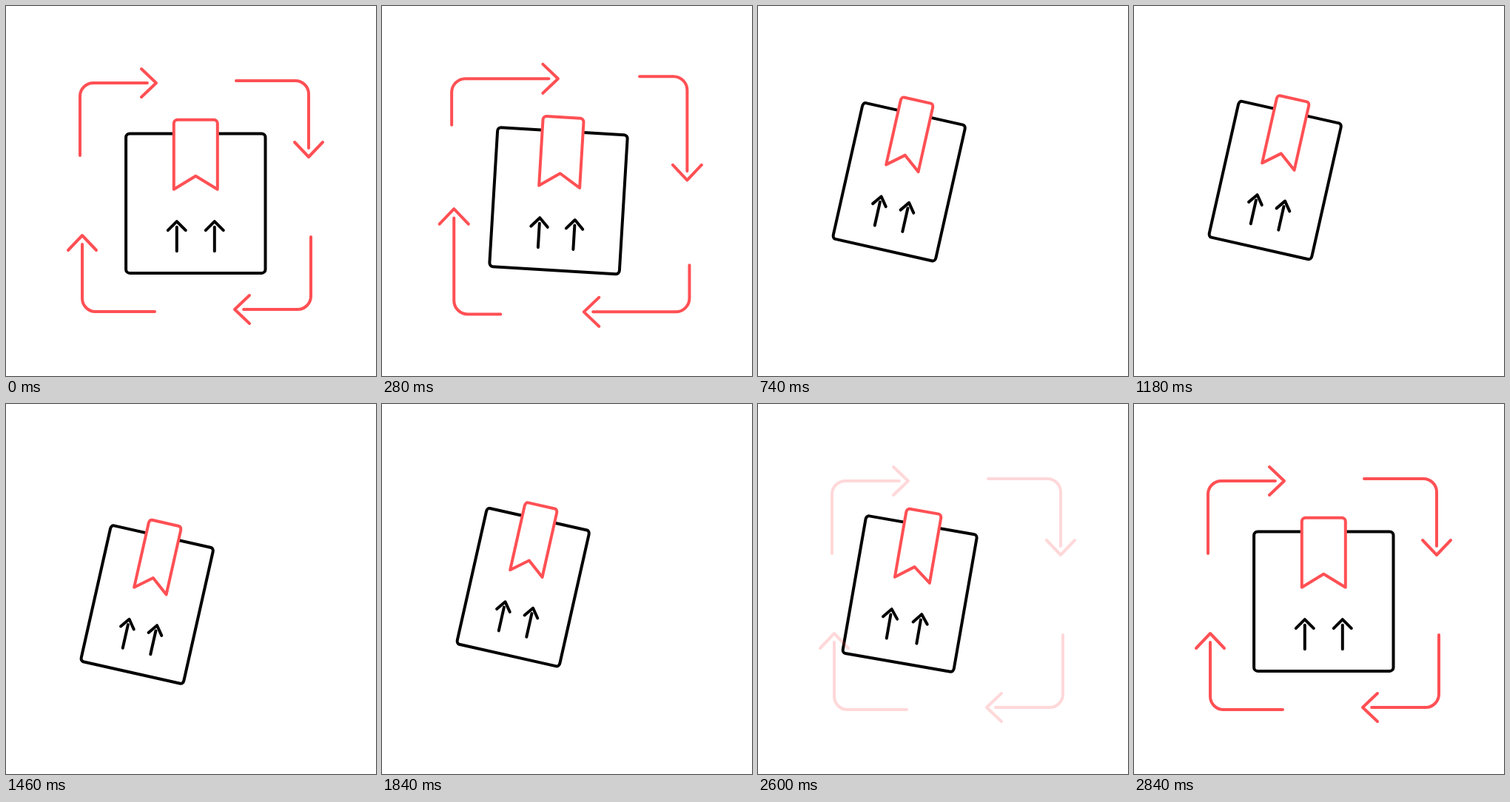
Recreate the animation shown at these times as an HTML page with a canvas. Size 500 by 500 pixels, loop 3000 ms.

```html
<!DOCTYPE html>
<html lang="en">
<head>
<meta charset="utf-8">
<title>Parcel in motion</title>
<style>
  html, body { margin: 0; width: 100%; height: 100%; overflow: hidden; background: #fff; }
  canvas { display: block; }
</style>
</head>
<body>
<canvas id="stage" width="500" height="500"></canvas>
<script>
const ctx = document.getElementById('stage').getContext('2d');
const LOOP = 3000;
const RED = '#ff5054';
const STROKE = 4;
const LEAVE = 167, AWAY = 500, RETURN = 2500, HOME = 2833;

// Height of the parcel's centre: [time, y]
const BOUNCE = [
  [LEAVE, 266.7], [AWAY, 253.7], [1000, 220], [1500, 272],
  [2000, 240], [RETURN, 253.7], [HOME, 266.7]
];

// Tip and tail travel of each arrow, clockwise from top left
const TRAVEL = [[210, 214], [190, 204], [204, 211], [202, 211]];
const BODY = 181;

const lerp = (a, b, p) => a + (b - a) * p;

function ease(t, from, to) {
  const p = Math.min(1, Math.max(0, (t - from) / (to - from)));
  return p * p * (3 - 2 * p);
}

function follow(keys, t) {
  return keys.slice(1).reduce(
    (y, [time, next], i) => lerp(y, next, ease(t, keys[i][0], time)), keys[0][1]);
}

function line(...points) {
  points.forEach(([x, y], i) => i ? ctx.lineTo(x, y) : ctx.moveTo(x, y));
}

// Builds a shape in the parcel's own space, then strokes it with an even line.
function shape(pose, color, build, fill) {
  ctx.save();
  ctx.translate(pose.x, pose.y);
  ctx.rotate(pose.angle);
  ctx.scale(pose.width, 1);
  ctx.beginPath();
  build();
  ctx.restore();
  if (fill) ctx.fill();
  ctx.strokeStyle = color;
  ctx.stroke();
}

function drawParcel(t) {
  const p = ease(t, LEAVE, AWAY) - ease(t, RETURN, HOME);
  const pose = {
    x: lerp(256.3, 190.7, p),
    y: follow(BOUNCE, t),
    angle: lerp(0, 12.7, p) * Math.PI / 180,
    width: lerp(1, 0.754, p)
  };
  shape(pose, '#000', () => ctx.roundRect(-94.2, -94.2, 188.4, 188.4, 5));
  shape(pose, '#000', () => {
    for (const x of [-25.5, 25.5]) {
      line([x - 12, 36.5], [x, 24.5], [x + 12, 36.5]);
      line([x, 32], [x, 64.5]);
    }
  });
  shape(pose, RED, () => {
    ctx.moveTo(-29.5, -19);
    ctx.arcTo(-29.5, -113, 0, -113, 5);
    ctx.arcTo(29.5, -113, 29.5, -19, 5);
    ctx.lineTo(29.5, -19);
    ctx.lineTo(0, -37);
    ctx.closePath();
  }, true);
}

function drawArrow([tipTravel, tailTravel], k) {
  const tip = -53 + tipTravel * k;
  const tail = tailTravel * k;
  ctx.setLineDash([BODY + tipTravel * k - tail, 5000]);
  ctx.lineDashOffset = -tail;
  ctx.beginPath();
  ctx.moveTo(-156, -55);
  ctx.arcTo(-156, -153, 0, -153, 18);
  ctx.lineTo(2000, -153);
  ctx.stroke();
  ctx.setLineDash([]);
  ctx.beginPath();
  line([tip - 20, -172], [tip, -153], [tip - 20, -134]);
  ctx.stroke();
}

function drawArrows(t) {
  if (t > 720 && t < RETURN) return;
  const back = t >= RETURN;
  const p = back ? 0 : ease(t, LEAVE, AWAY);
  const k = back ? 0 : (Math.max(0, t - LEAVE) / 273) ** 2;
  const zoom = 1 + 0.11 * p;
  ctx.save();
  ctx.globalAlpha = back ? ease(t, RETURN, HOME) : 1;
  ctx.strokeStyle = RED;
  ctx.lineWidth = STROKE / zoom;
  ctx.translate(256 - 4.4 * p, 257 - 4.4 * p);
  ctx.scale(zoom, zoom);
  for (const travel of TRAVEL) {
    drawArrow(travel, k);
    ctx.rotate(Math.PI / 2);
  }
  ctx.restore();
}

function draw() {
  const t = performance.now() % LOOP;
  ctx.fillStyle = '#fff';
  ctx.fillRect(0, 0, 500, 500);
  ctx.lineWidth = STROKE;
  ctx.lineCap = ctx.lineJoin = 'round';
  drawParcel(t);
  drawArrows(t);
  requestAnimationFrame(draw);
}
draw();
</script>
</body>
</html>
```
